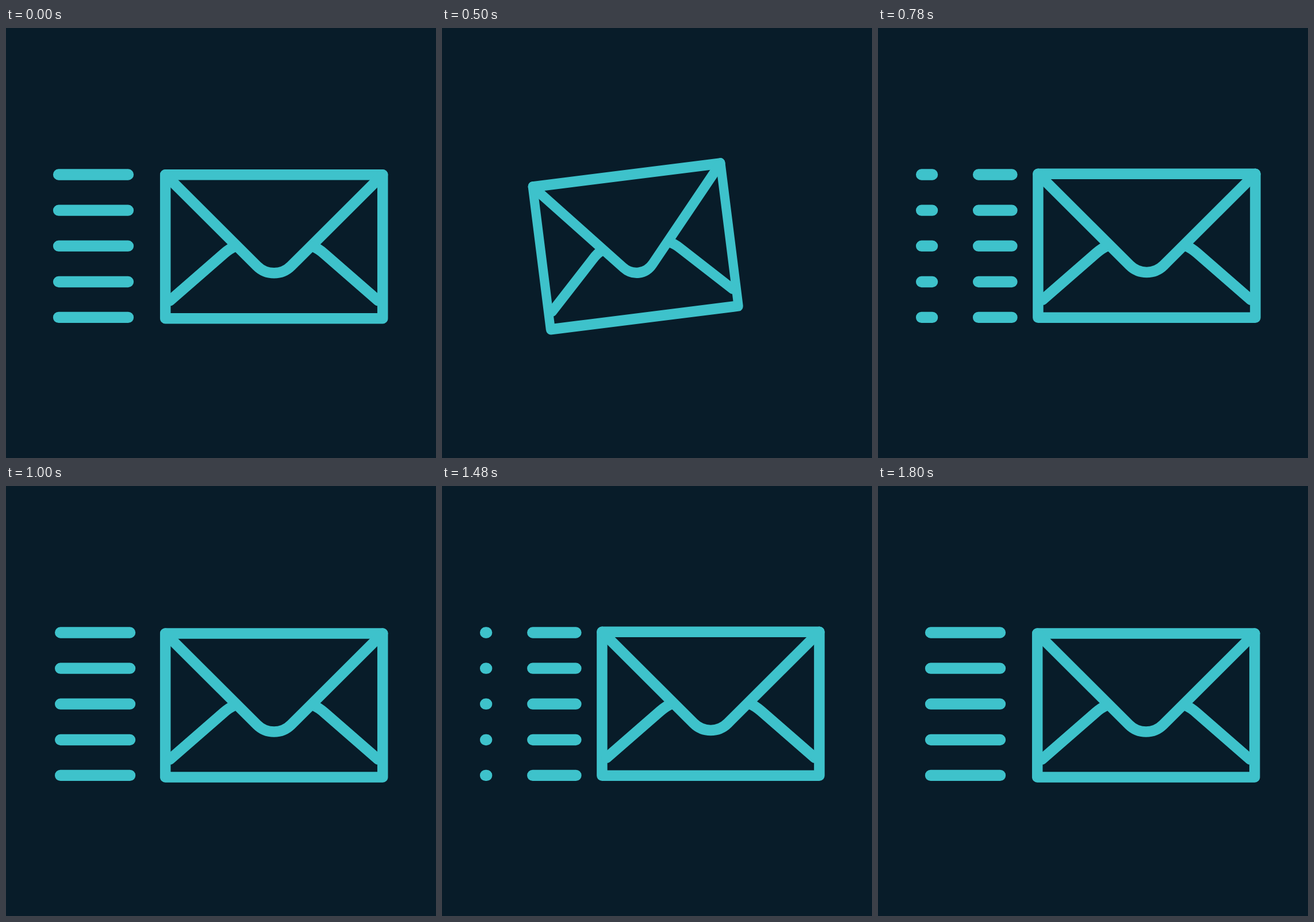
Animation of 748x748 px, one loop 1.82 s. Source, as an HTML page:

```html
<!DOCTYPE html>
<html lang="en">
<head>
<meta charset="utf-8">
<title>Flying envelope</title>
<style>
  html, body { margin: 0; width: 100%; height: 100%; overflow: hidden; background: #081c29; }
  svg { display: block; width: 100vw; height: 100vh; }
  path { fill: none; stroke: #3ec2cb; stroke-linecap: round; stroke-linejoin: round; }
  #lines { stroke-width: 19.3; stroke-dasharray: 121 80; }
  #mail path { stroke-width: 18.5; }
</style>
</head>
<body>
<svg viewBox="0 0 748 748">
  <path id="lines" d="M75.6 255H233M75.6 317.2H233M75.6 379.2H233M75.6 441.5H233M75.6 503.4H233"/>
  <g id="mail">
    <path d="M-189-125H189V125H-189Z"/>
    <path d="M-189-125L-29.7 33.8A42 42 0 0 0 29.7 33.8L189-125"/>
    <path id="fold" d="M-181 94L-88 13Q-78 4-68 0"/>
    <path d="M181 94L88 13Q78 4 68 0"/>
  </g>
</svg>
<script>
const LOOP = 1820, STEP = 20, PERIOD = 201;
const lines = document.getElementById('lines');
const mail = document.getElementById('mail');

const progress = (t, start, length) => Math.min(1, Math.max(0, (t - start) / length));
const easeInOut = x => x < 0.5 ? 16 * x ** 5 : 1 - 16 * (1 - x) ** 5;

// Small repeating rattle once the envelope has arrived
function rattle(t) {
  if (t < 620) return [0, 0];
  const a = t / 100 * 2 * Math.PI;
  return [
    0.42 * Math.sin(2 * a) - 1.53 * Math.sin(a),
    0.17 * Math.cos(a) + 1.43 * Math.cos(2 * a) - 0.3
  ];
}

function draw(t) {
  const pull = easeInOut(progress(t, 0, 230)) - easeInOut(progress(t, 366, 300));
  const [dx, dy] = rattle(t);
  mail.setAttribute('transform',
    `translate(${466.2 - 181 * pull + dx} ${380.2 - 0.5 * pull + dy}) ` +
    `rotate(${-10 * pull}) scale(${1 - 0.18 * pull} 1)`);

  const run = 3 * PERIOD * progress(t, 629, 1096);
  lines.style.visibility = t >= STEP && t < 620 ? 'hidden' : 'visible';
  lines.style.strokeDashoffset = 3 * PERIOD - 15.9 - run;
}

function tick() {
  draw(Math.floor(performance.now() % LOOP / STEP) * STEP);
  requestAnimationFrame(tick);
}
tick();
</script>
</body>
</html>
```
